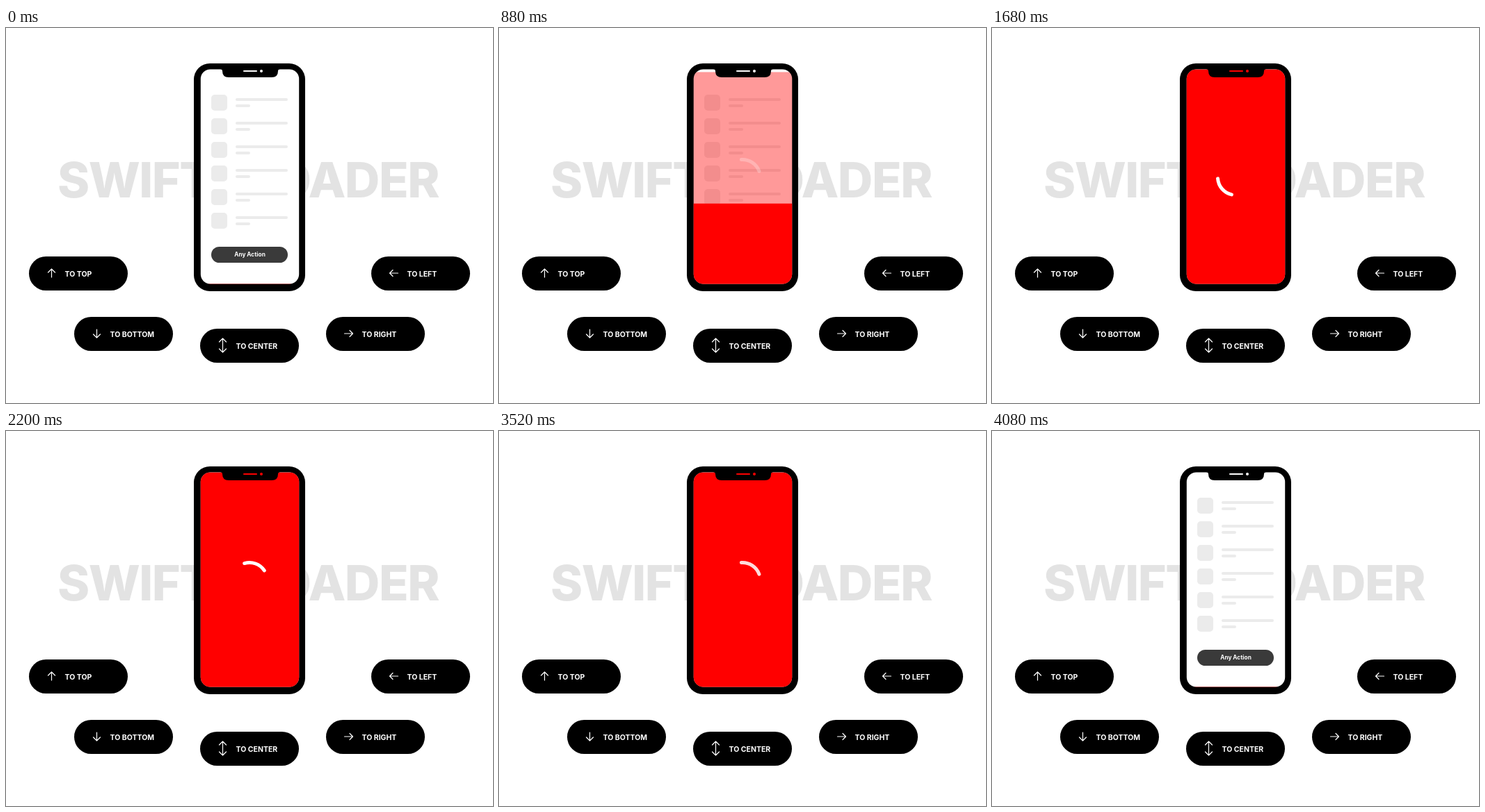
These frames come from a looping animation (700 px wide and 540 px high, 4.12 s). An HTML page:

```html
<!DOCTYPE html>
<html lang="en">
<head>
<meta charset="utf-8">
<title>Swift Loader</title>
<style>
  html, body { margin: 0; width: 100%; height: 100%; overflow: hidden; background: #fff; }
  svg { display: block; width: 700px; height: 540px; font-family: Inter, "Open Sans", sans-serif; font-weight: 700; }
  .title { font-size: 70px; font-weight: 800; letter-spacing: -1.5px; fill: #e3e3e3; }
  .label { font-size: 10.5px; fill: #fff; }
  .action { font-size: 8.3px; fill: #fff; }
  .icon { fill: none; stroke: #fff; stroke-width: 1.2; stroke-linecap: round; stroke-linejoin: round; }
</style>
</head>
<body>
<svg viewBox="0 0 700 540">
  <defs>
    <clipPath id="screen"><rect x="279.8" y="59.5" width="141.4" height="309" rx="14"/></clipPath>
  </defs>

  <text class="title" x="74" y="244">SWIFT</text>
  <text class="title" x="622" y="244" text-anchor="end">LOADER</text>

  <rect x="270" y="51" width="160" height="328" rx="23"/>
  <g clip-path="url(#screen)">
    <rect x="279" y="59" width="143" height="310" fill="#fff"/>
    <g id="rows" fill="#ebebeb"></g>
    <rect x="295" y="315" width="110" height="23" rx="11.5" fill="#3a3a3a"/>
    <text class="action" x="350.5" y="329.3" text-anchor="middle">Any Action</text>
    <rect id="tint" x="279" width="143" height="310" fill="#f00" opacity=".4"/>
    <rect id="solid" x="279" width="143" height="310" fill="#f00"/>
    <path id="arc" d="M20.5-15.2A25.5 25.5 0 0 1 20.5 15.2" fill="none" stroke="#fff" stroke-width="5" stroke-linecap="round"/>
  </g>
  <path d="M308 59Q311 59.500 311 62Q311 71 320 71H382Q391 71 391 62Q391 59.500 394 59Z"/>
  <g id="speaker">
    <rect x="341" y="61" width="20" height="2" rx="1"/>
    <circle cx="367" cy="62" r="2"/>
  </g>
  <g id="pills"></g>
</svg>
<script>
  const LOOP = 4120, STEP = 40, TOP = 59.5, HEIGHT = 309;
  const el = id => document.getElementById(id);
  const ramp = (t, start, length) => Math.min(1, Math.max(0, (t - start) / length));
  const ease = p => p * p * (3 - 2 * p);

  const up = n => `M0 ${n}V${-n}M-5 ${5 - n}L0 ${-n}L5 ${5 - n}`;
  const down = n => `M0 ${-n}V${n}M-5 ${n - 5}L0 ${n}L5 ${n - 5}`;
  const pills = [
    [33, 329, 'TO TOP', up(6)],
    [98, 416, 'TO BOTTOM', down(6)],
    [279, 433, 'TO CENTER', up(10) + down(10)],
    [460, 416, 'TO RIGHT', 'M-6 0H6M1.500-4.500L6 0L1.500 4.500'],
    [525, 329, 'TO LEFT', 'M6 0H-6M-1.500-4.500L-6 0L-1.500 4.500']
  ];
  el('pills').innerHTML = pills.map(([x, y, label, icon]) => `
    <g transform="translate(${x} ${y})">
      <rect width="142" height="49" rx="24.5"/>
      <path class="icon" d="${icon}" transform="translate(32.5 24)"/>
      <text class="label" x="51.500" y="29">${label}</text>
    </g>`).join('');

  el('rows').innerHTML = Array.from({ length: 6 }, (_, i) => `
    <g transform="translate(295 ${96 + 34 * i})">
      <rect width="23" height="23" rx="5"/>
      <rect x="35" y="5" width="75" height="4" rx="2"/>
      <rect x="35" y="14" width="21" height="4" rx="2"/>
    </g>`).join('');

  // Each layer rises from the bottom edge, then drops back out.
  function layerTop(t, enter, leave) {
    const cover = ease(ramp(t, enter, 450)) - ease(ramp(t, leave, 195));
    return TOP + HEIGHT * (1 - cover);
  }

  function draw(now) {
    const t = Math.floor(now % LOOP / STEP) * STEP;
    const tintTop = layerTop(t, 460, 3885);
    const solidTop = layerTop(t, 693, 3700);
    el('tint').setAttribute('y', tintTop);
    el('solid').setAttribute('y', solidTop);
    el('speaker').setAttribute('fill', solidTop < 62 ? '#f00' : tintTop < 62 ? '#f99' : '#fff');

    const angle = 303 + 720 * ramp(t, 1003, 2484);
    el('arc').setAttribute('transform', `translate(350 215) rotate(${angle})`);
    el('arc').setAttribute('opacity', ramp(t, 830, 200) - ramp(t, 3490, 210));
    requestAnimationFrame(draw);
  }
  draw(0);
</script>
</body>
</html>
```
